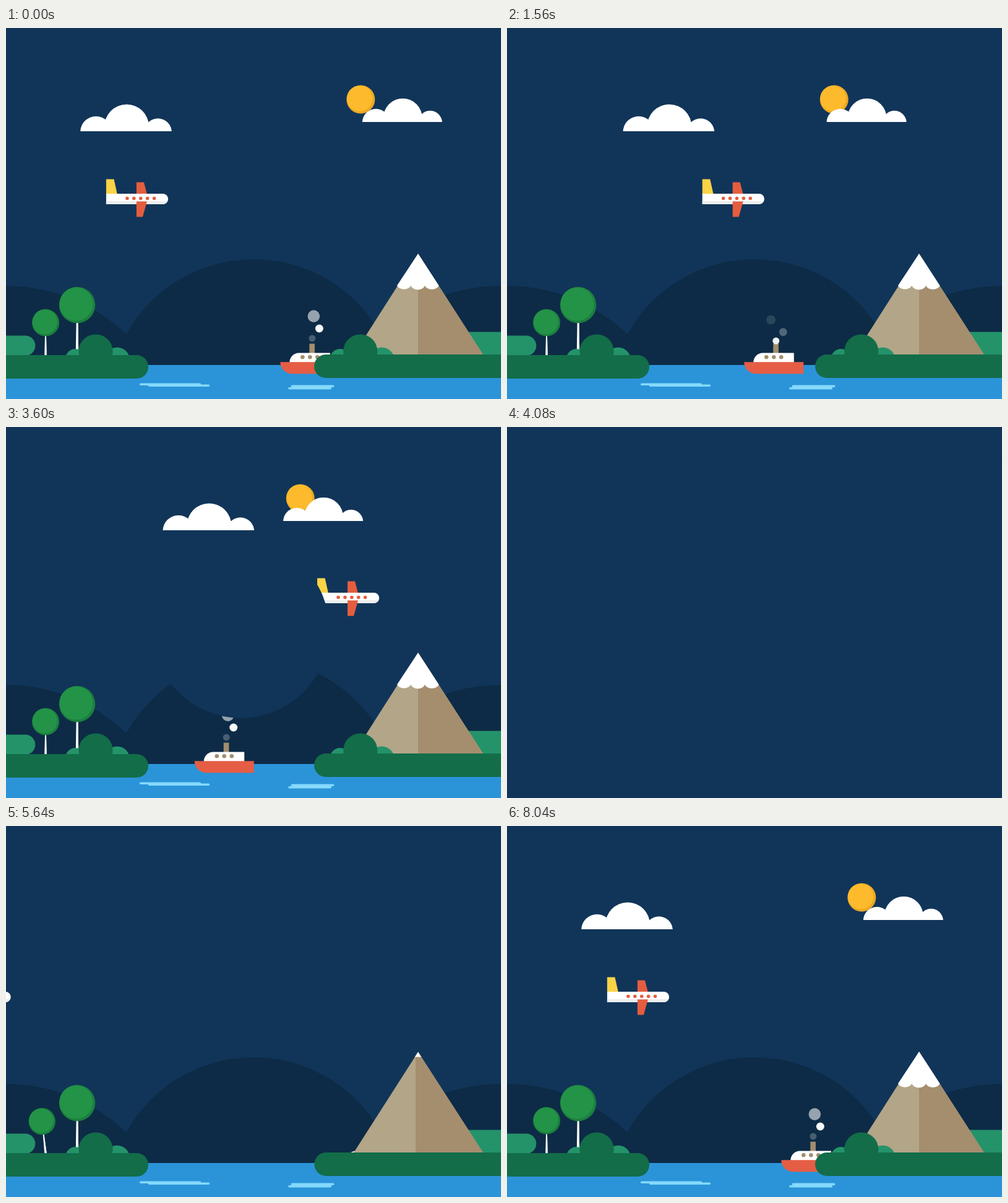
Animation of 800 by 600 pixels, one loop 8.1 s. Source, as an HTML page:

```html
<!DOCTYPE html>
<html lang="en">
<head>
<meta charset="utf-8">
<title>Night bay</title>
<style>
html, body { margin: 0; width: 100%; height: 100%; overflow: hidden; background: #113559; }
svg { display: block; width: 800px; height: 600px; }
</style>
</head>
<body>
<svg viewBox="0 0 800 600">
  <defs>
    <clipPath id="cloudBase"><rect x="-5" y="-50" width="160" height="50"/></clipPath>
    <clipPath id="rightFace"><rect id="ridge" x="666" y="360" width="200" height="170"/></clipPath>
    <clipPath id="snowLine"><rect id="snowClip" x="600" y="360" width="140" height="0"/></clipPath>
    <g id="cloud" clip-path="url(#cloudBase)" fill="#fff">
      <circle cx="25.5" cy="1" r="25.3"/><circle cx="75" cy="-7.5" r="36"/><circle cx="125.5" cy="1.5" r="22.3"/>
    </g>
    <g id="bush">
      <g fill="#24936a"><circle cx="-33" cy="6" r="16"/><circle cx="34.5" cy="8" r="20.5"/></g>
      <circle cy="-6" r="27.6" fill="#136d49"/>
    </g>
  </defs>
  <rect width="800" height="600" fill="#113559"/>

  <g fill="#0d2b46">
    <circle id="hillLeft" cy="698" r="281"/>
    <circle id="hillRight" cx="800" cy="698" r="281"/>
    <circle id="hillMid" cy="64" r="235"/>
  </g>

  <g id="sun">
    <circle r="23" fill="#eaa724"/>
    <circle cx="-1.5" cy="-1.5" r="20.8" fill="#fdba2c"/>
  </g>
  <g id="cloudLeft"><use href="#cloud" x="-74"/></g>
  <g id="cloudRight"><use href="#cloud" x="-74"/></g>

  <g id="plane">
    <path d="M0 244.5H12.5L18 269H0Z" fill="#fbd347"/>
    <path d="M49 249.5H61L66 269H49Z" fill="#e55d3f"/>
    <path d="M0 268H91.7a8.5 8.5 0 0 1 0 17H0Z" fill="#fff"/>
    <path d="M0 280H99a8.5 8.5 0 0 1-7.3 5H0Z" fill="#eceeef"/>
    <path d="M49 280.5H66L59 305.5H49Z" fill="#e55d3f"/>
    <path d="M34 275.5h45" stroke="#e55d3f" stroke-width="5.6" stroke-linecap="round" stroke-dasharray="0 10.9"/>
  </g>

  <rect id="water" width="800" height="70" fill="#2b94d9"/>
  <g id="waves" stroke="#85d9fb" stroke-width="3.5" stroke-linecap="round">
    <path d="M231.7 578.2H327.3"/><path d="M462.3 579.3H528.6"/>
    <path d="M457.8 582.8H524.3"/><path d="M217.7 576.2H313.3"/>
  </g>

  <g id="ship">
    <rect x="47" y="510.5" width="8.6" height="17" fill="#a28e6e"/>
    <g id="smoke" fill="#fff"></g>
    <path d="M15 541a15 15.5 0 0 1 15-15.5H80.5V541Z" fill="#fff"/>
    <path d="M36 532.3h25" stroke="#a28e6e" stroke-width="6.6" stroke-linecap="round" stroke-dasharray="0 12"/>
    <path d="M0 540.3H96V559.3H20A19.5 19 0 0 1 0 540.3Z" fill="#e55d45"/>
  </g>

  <rect id="fieldRight" x="690" y="491.5" width="180" height="50" rx="16" fill="#24936a"/>
  <g id="mountain">
    <path d="M666 365L771.5 529H561.5Z" fill="#b3a587"/>
    <path d="M666 365L771.5 529H561.5Z" fill="#a48e6e" clip-path="url(#rightFace)"/>
    <path d="M666 365L632 416.5a11.5 8 0 0 0 22.3 0a11.5 8 0 0 0 22.7 0a11.5 8 0 0 0 22.5 0Z" fill="#fff" clip-path="url(#snowLine)"/>
  </g>
  <g id="bushRight"><use href="#bush"/></g>
  <rect id="groundRight" x="498" y="528" width="420" height="38" rx="19" fill="#136d49"/>

  <rect id="fieldLeft" x="-100" y="497.5" width="147.3" height="32.5" rx="16.2" fill="#24936a"/>
  <g id="treeBig">
    <path d="M-.8 -90H1L2.3 0H-2.3Z" fill="#fff"/><path d="M.3 -90H1L2.3 0H.6Z" fill="#d5dcda"/>
    <circle cy="-81" r="29.2" fill="#1c7f3e"/><circle cx="-1.5" cy="-82.5" r="27" fill="#239348"/>
  </g>
  <g id="treeSmall">
    <path d="M-.7 -40H.7L1.8 0H-1.8Z" fill="#fff"/><path d="M.2 -40H.7L1.8 0H.5Z" fill="#d5dcda"/>
    <circle cy="-52.5" r="22" fill="#1c7f3e"/><circle cx="-1.2" cy="-53.7" r="20" fill="#239348"/>
  </g>
  <g id="bushLeft"><use href="#bush"/></g>
  <rect id="groundLeft" x="-100" y="529" width="330" height="38" rx="19" fill="#136d49"/>

  <circle id="iris" cx="379.5" cy="327.5" fill="#113559"/>
</svg>
<script>
const LOOP = 8100, STEP = 60, SCENE = 8040, CURTAIN = 4140;
const SMOKE_PERIOD = 900, SMOKE_HALF = 345, SMOKE_START = 5635;

const el = id => document.getElementById(id);
const clamp = v => Math.max(0, Math.min(1, v));
const ramp = (t, start, length) => clamp((t - start) / length);
const expoOut = u => u >= 1 ? 1 : 1 - 2 ** (-10 * u);
const appear = (t, start, length = 1000) => expoOut(ramp(t, start, length));
const smooth = u => u * u * (3 - 2 * u);

const place = (id, x, y = 0, sx = 1, sy = sx, angle = 0) =>
  el(id).setAttribute('transform', `translate(${x} ${y}) rotate(${angle}) scale(${sx} ${sy})`);
const show = (id, on) => el(id).setAttribute('visibility', on ? 'visible' : 'hidden');

function along(points, t) {
  let i = 1;
  while (i < points.length - 1 && points[i][0] < t) i++;
  const [t0, a] = points[i - 1], [t1, b] = points[i];
  return a + (b - a) * (t - t0) / (t1 - t0);
}

const drift = {
  cloudLeft: [[7260, 87], [8040, 120], [8880, 156.5], [9720, 192.5], [10560, 223.5], [11640, 253.3]],
  cloudRight: [[5880, 626], [6720, 604], [7260, 594.3], [8040, 575.6], [8880, 546], [9600, 516.3], [10560, 479], [11640, 447.8]],
  sun: [[6600, 594], [7260, 586.5], [8040, 573.3], [8880, 551], [9600, 528.7], [10560, 501], [11640, 475.7]]
};

const puffs = [
  { x: 51.5, y: 506.4, r: 5.5, peak: -259, rise: .017 },
  { x: 63, y: 485.8, r: 6.5, peak: 10, rise: .024 },
  { x: 54, y: 460.5, r: 9.8, peak: 150, rise: .0375 },
  { x: 43.3, y: 479.5, r: 7.5, peak: 359, rise: .025 }
];
for (const p of puffs) {
  p.node = document.createElementNS('http://www.w3.org/2000/svg', 'circle');
  p.node.setAttribute('cx', p.x);
  p.node.setAttribute('r', p.r);
  el('smoke').append(p.node);
}

function drawLand(t) {
  const slide = (id, start, distance) => place(id, distance * (1 - appear(t, start)));
  slide('hillLeft', 4666, -281);
  slide('hillRight', 4666, 281);
  slide('groundLeft', 4414, -232);
  slide('groundRight', 4670, 304);
  slide('fieldLeft', 4614, -60);
  slide('fieldRight', 4720, 130);

  const settle = smooth(ramp(t, 5040, 460));
  place('hillMid', 400, 545, 1.065 - .065 * settle, appear(t, 4360, 400) * (.947 + .053 * settle));
  place('water', 0, 600 - 55 * appear(t, CURTAIN, 1500));
  [4480, 4660, 4790, 5000].forEach((start, i) =>
    el('waves').children[i].setAttribute('opacity', ramp(t, start, 240)));

  const grown = appear(t, 4800);
  place('mountain', 0, 528 * (1 - grown), 1, grown);
  el('ridge').setAttribute('x', 666 - 104 * (1 - appear(t, 5170)));
  el('snowClip').setAttribute('height', 5 + 62 * appear(t, 5620));

  place('bushLeft', 145, 529, appear(t, 5000, 700));
  place('bushRight', 572.7, 529, appear(t, 5660, 700));
  const tree = (id, x, y, start) =>
    place(id, x, y, appear(t, start, 650), undefined, -40 * (1 - ramp(t, start, 650)) ** 2);
  tree('treeBig', 115, 529, 4950);
  tree('treeSmall', 64, 529, 5250);
}

function drawSky(t) {
  place('cloudLeft', along(drift.cloudLeft, t) + 74, 167, appear(t, 5660, 450));
  const size = .875;
  place('cloudRight', along(drift.cloudRight, t) + 74 * size, 152, size * appear(t, 5900, 450));
  place('sun', along(drift.sun, t), 115.5, appear(t, 6000, 600));

  const s = t - 5640;
  place('plane', -92.5 + .1105 * s - 1.875e-6 * s * s);
  show('plane', t > 5500);
}

function drawShip(t) {
  place('ship', 443.3 - .0385 * (t - SCENE));
  show('ship', t > 5400);
  for (const p of puffs) {
    const begin = SMOKE_START + p.peak - puffs[0].peak;
    const age = t - begin;
    const dt = age % SMOKE_PERIOD - SMOKE_HALF;
    p.node.setAttribute('cy', p.y - p.rise * dt);
    p.node.setAttribute('opacity', age < 0 ? 0 : clamp(1 - Math.abs(dt) / SMOKE_HALF));
  }
}

function draw(now) {
  const clock = Math.floor(now % LOOP / STEP) * STEP;
  // Scene time runs on from the build-up until the iris has closed it.
  const t = clock < CURTAIN ? clock + SCENE : clock;
  drawLand(t);
  drawSky(t);
  drawShip(t);
  el('iris').setAttribute('r', Math.max(0, .75 * (t - SCENE - 3409)));
}

let origin;
function tick(now) {
  origin ??= now;
  draw(now - origin);
  requestAnimationFrame(tick);
}
draw(0);
requestAnimationFrame(tick);
</script>
</body>
</html>
```
